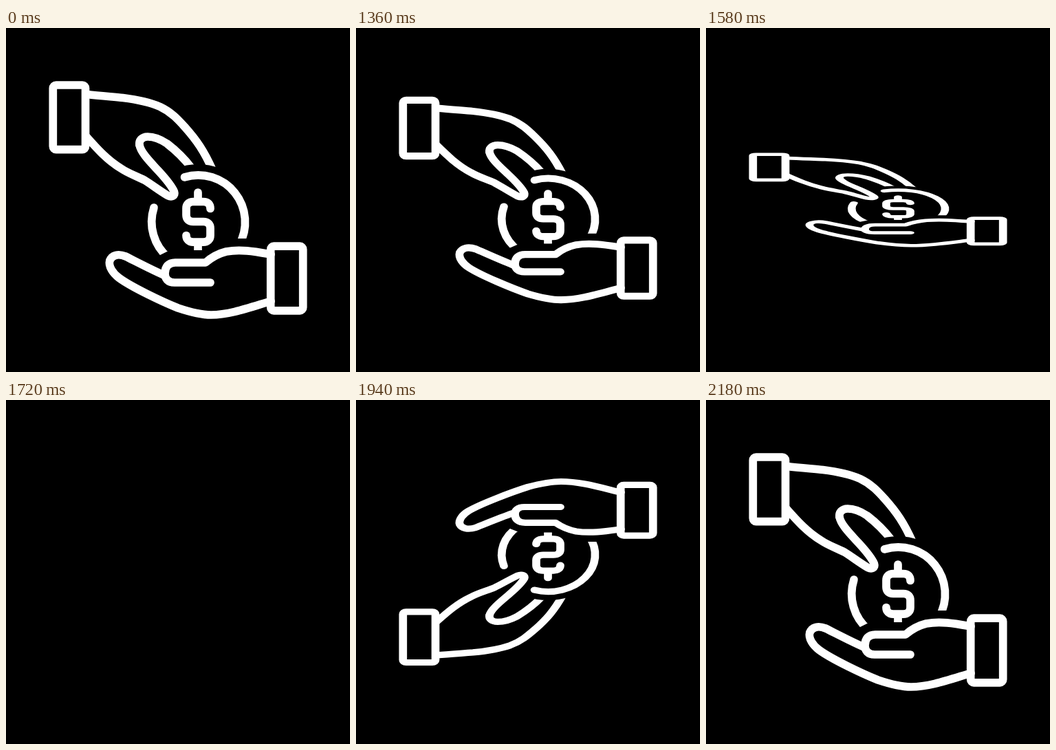
These frames come from a looping animation (500x500 px, 3 s). An HTML page:

```html
<!DOCTYPE html>
<html lang="en">
<head>
<meta charset="utf-8">
<title>Hand to hand</title>
<style>
  html, body { margin: 0; width: 100%; height: 100%; overflow: hidden; background: #000; }
  svg { display: block; width: 100vw; height: 100vh; }
  .line { fill: none; stroke: #fff; stroke-width: 11.7; stroke-linecap: round; stroke-linejoin: round; }
</style>
</head>
<body>
<svg viewBox="0 0 500 500">
  <g id="icon">
    <!-- back of the giving hand and thumb, cut by the gap around the coin -->
    <g class="line">
      <path d="M118 96.5C136 98.5 155 100 170 101.5C190 104 208 107.5 224 114.5C240 122 250 133 260 144C277 163 288 179 300 206"/>
      <path d="M270 204C258 188 247 178 234 168C222 160 213 158 206 158C197 158 193 164 194 170"/>
    </g>
    <circle cx="279" cy="282" r="84"/>

    <!-- coin -->
    <g class="line">
      <path d="M259.500 216.800A68.200 68.200 0 0 1 338.500 316"/>
      <path d="M215 261A68.200 68.200 0 0 0 236 334"/>
    </g>
    <path d="M325 306H362V332H325ZM213 335.5L240 322L252 350H218Z"/>
    <g class="line">
      <path d="M297 262.5C297 256 293 252.500 287 252.500H272C266 252.500 262 256 262 262V272C262 278 266 281.500 272 281.500H287C293 281.500 297 285 297 291V301.500C297 307.500 293 311.200 287 311.200H272C266 311.200 262 307.500 262 301.500"/>
      <path d="M279 239V251"/>
      <path d="M279 311V323" stroke-linecap="butt"/>
    </g>

    <!-- giving hand: finger and wrist -->
    <path class="line" d="M194 170C196 181 209 194 221 207C234 221 241 230 244.500 238C246.500 244 241 246.500 235 243.500C221 235 211 227 201 221C189 215 177 211 167 204C147 192 132 175 116 157"/>

    <!-- receiving hand -->
    <g class="line">
      <path d="M228 358.500C209 350 190 340 174 332C163 327.500 154 330 150.800 338C148.500 347 156 357 164 363C176 372 191 379.500 205 386.500C220 394 235 401 250 407C268 413 283 417 298 417C325 417 352 407 385 397"/>
      <path d="M297 370H245C235 370 231 364 231 357C231 347 236 341 246 341H290C299 333 308 328 320 325C341 321 362 325 385 329"/>
    </g>

    <!-- cuffs -->
    <g class="line">
      <rect x="68.300" y="83" width="47.200" height="93.600" rx="4.500"/>
      <rect x="384.700" y="317.200" width="47" height="93.600" rx="4.500"/>
    </g>
  </g>
</svg>
<script>
  const LOOP = 3000, STEP = 20;
  // time in ms, angle in degrees, speed in degrees per ms
  const turn = [
    [1200, 0, 0.15],
    [1480, 52.6, 0.17],
    [1720, 90, 0.24],
    [1840, 148.8, 0.58],
    [2040, 287.8, 0.59],
    [2180, 360, 0.4]
  ];
  const icon = document.getElementById('icon');

  function angleAt(t) {
    const i = turn.findIndex(key => t < key[0]);
    if (i < 1) return 0;
    const [t0, a0, v0] = turn[i - 1], [t1, a1, v1] = turn[i];
    const d = t1 - t0, u = (t - t0) / d, w = 1 - u;
    return w * w * ((1 + 2 * u) * a0 + u * d * v0) +
           u * u * ((1 + 2 * w) * a1 - w * d * v1);
  }

  function draw() {
    const t = Math.floor(performance.now() % LOOP / STEP) * STEP;
    const flip = Math.cos(angleAt(t) * Math.PI / 180);
    icon.style.display = Math.abs(flip) < 0.001 ? 'none' : '';
    icon.setAttribute('transform', `translate(0 250) scale(1 ${flip}) translate(0 -250)`);
    requestAnimationFrame(draw);
  }
  draw();
</script>
</body>
</html>
```
